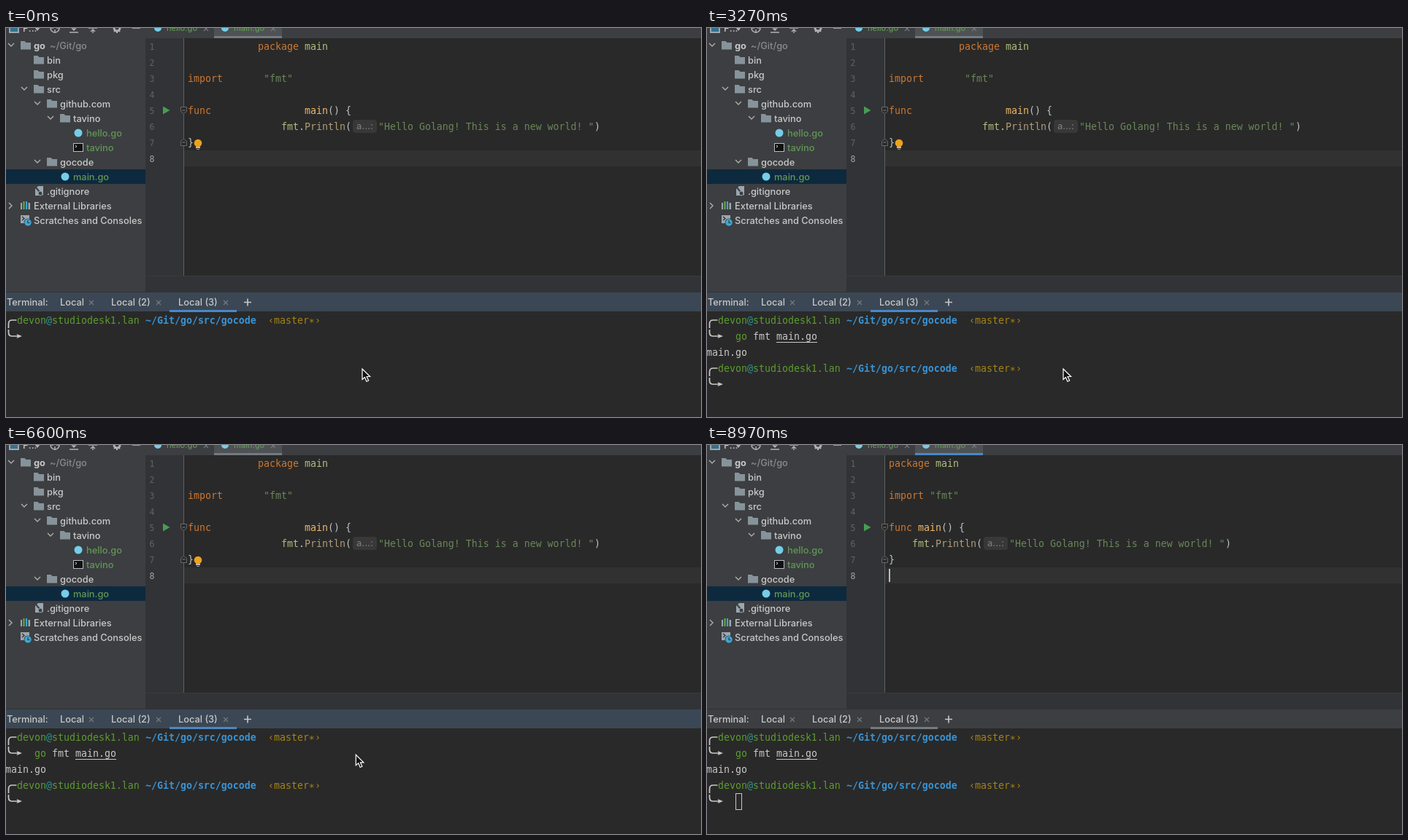
These frames come from a looping animation (952x534 px, 9010 ms). An HTML page:

```html
<!DOCTYPE html>
<html lang="en">
<head>
<meta charset="utf-8">
<title>go fmt</title>
<style>
html, body { margin: 0; width: 100%; height: 100%; overflow: hidden; background: #292929; }
svg { display: block; }
text { white-space: pre; }
.ui { font: 500 12.8px Inter, "Open Sans", sans-serif; }
.mono { font: 13.288px "DejaVu Sans Mono", "Liberation Mono", monospace; font-variant-ligatures: none; }
.small { font-size: 11px; }
.num { font-size: 11.5px; }
.bold { font-weight: 700; }
</style>
</head>
<body>
<svg id="stage" width="952" height="534" viewBox="0 0 952 534"></svg>
<script>
const LOOP = 9010, COL = 8, ROW = 22;
const PANEL = '#3c3e41', EDITOR = '#292929', BLUE = '#4a88c7', GREY = '#747a80';
const GREEN = '#629755', KEY = '#cc7832', STR = '#6a8759', PLAIN = '#bcc3c8', PKG = '#afbf7e',
  FUNC = '#f0b868', LIGHT = '#c8c8c8', SHELL = '#5c9c2f';
const stage = document.getElementById('stage');

// Drawing helpers
const rect = (x, y, w, h, fill, extra = '') =>
  `<rect x="${x}" y="${y}" width="${w}" height="${h}" fill="${fill}" ${extra}/>`;
const line = (d, color, width = 1, extra = '') =>
  `<path d="${d}" fill="none" stroke="${color}" stroke-width="${width}" ${extra}/>`;
const shape = (d, fill, extra = '') => `<path d="${d}" fill="${fill}" ${extra}/>`;
const dot = (x, y, r, fill) => `<circle cx="${x}" cy="${y}" r="${r}" fill="${fill}"/>`;
const text = (cls, x, y, s, fill, extra = '') =>
  `<text class="${cls}" x="${x}" y="${y}" fill="${fill}" ${extra}>${s}</text>`;
const ui = (...a) => text('ui', ...a);
const mono = (...a) => text('mono', ...a);
const group = (id, body) => `<g id="${id}">${body}</g>`;
const codeY = n => 8 + n * ROW;
const termY = n => 384 + n * ROW;

const folder = (x, y) =>
  shape(`M${x} ${y - 6}h5.5l2 2h6.5v9.5h-14z`, '#87939a');
const chevron = (x, y, right) =>
  line(right ? `M${x - 3} ${y - 4}l4 4l-4 4` : `M${x - 4} ${y - 2}l4 4l4-4`, '#adadad', 1.4);
const cross = (x, y) =>
  line(`M${x - 3} ${y - 3}l6 6m0-6l-6 6`, '#777b7e', 1.1);
const fold = (y, up) =>
  shape(up ? `M239.5 ${y + 4.5}v-6l4-3l4 3v6z` : `M239.5 ${y - 4.5}v6l4 3l4-3v-6z`,
    EDITOR, 'stroke="#686868"') + line(`M241.5 ${y}h4`, '#808080');

function toolbar() {
  const c = '#afb1b3';
  return rect(4, -5, 14, 12, '#9aa7b0') + rect(6, -2, 10, 7, '#34718f') +
    ui(23, 5, 'P...', LIGHT) + shape('M39 -1h8l-4 5z', c) +
    `<circle cx="67" cy="0" r="6" fill="none" stroke="${c}" stroke-width="1.5"/>` +
    line('M67 -6v4M67 2v5M61 0h4M69 0h4', c, 1.4) +
    line('M87 6h12M93 -4v6M90 0l3 3l3-3', c, 1.4) +
    line('M113 0h12M119 7v-5M116 5l3-3l3 3', c, 1.4) +
    `<circle cx="152" cy="0" r="4" fill="none" stroke="${c}" stroke-width="3"/>` +
    line('M148 5l2-2M156 5l-2-2M152 3v4', c, 2) + line('M173 0h11', c, 1.6);
}

function tree() {
  const label = (x, y, s, fill = LIGHT) => ui(x, y + 4.7, s, fill);
  const dirs = [[20, 24], [38, 44, 'bin'], [38, 64, 'pkg'], [38, 84, 'src'],
    [56, 104, 'github.com'], [74, 124, 'tavino'], [56, 184, 'gocode']];
  return rect(0, 0, 191, 363, PANEL) + rect(0, 194, 191, 20, '#0d293e') + toolbar() +
    dirs.map(([x, y, s]) => folder(x, y) + (s ? label(x + 18, y, s) : '')).join('') +
    text('ui bold', 38, 28.7, 'go', LIGHT) + label(60, 24, '~/Git/go', '#8c8c8c') +
    [[7, 23], [25, 83], [43, 103], [61, 123], [43, 183]].map(p => chevron(...p)).join('') +
    dot(99, 144, 5.5, '#75cde8') + label(110, 144, 'hello.go', GREEN) +
    rect(92.5, 158.5, 13, 11, '#111', 'stroke="#b4bcc0"') +
    line('M95 161l2 1.5l-2 1.5', '#ddd') + label(110, 164, 'tavino', GREEN) +
    dot(81, 204, 5.5, '#75cde8') + label(92, 204, 'main.go', GREEN) +
    shape('M44 217h7v13h-11v-9z', '#9aa7b0') + line('M41 219l9 11', PANEL, 2) +
    `<circle cx="47" cy="227" r="3" fill="${PANEL}" stroke="#9aa7b0"/>` +
    label(56, 224, '.gitignore') + chevron(7, 244, true) +
    rect(20, 240, 2, 9, '#9aa7b0') + rect(23.5, 238, 2, 11, '#62b543') +
    rect(27, 238, 2, 11, '#40a6d0') + rect(30.5, 240, 2.5, 9, '#9aa7b0') +
    label(38, 244, 'External Libraries') +
    rect(20, 257, 12, 11, '#9aa7b0') + line('M22 259l3 2.5l-3 2.5', '#333', 1.3) +
    dot(30, 267, 5.5, PANEL) + dot(30, 267, 4.7, '#40a6d0') +
    line('M30 264v3.5h2.5', '#24414f', 1.2) + label(38, 264, 'Scratches and Consoles');
}

function editor() {
  const tab = (x, s) => dot(x, 0, 5, '#75cde8') + text('ui small', x + 12, 4, s, GREEN);
  let out = rect(191, 0, 761, 14, PANEL) + rect(285, 0, 93, 11, '#4e5254') +
    tab(208, 'hello.go') + tab(300, 'main.go') + cross(274, 1) + cross(366, 1) +
    rect(285, 11, 93, 3, GREY, 'id="fileMark"') +
    rect(191, 14, 53, 326, '#313336') + rect(244, 168, 708, 22, '#313131') +
    rect(243, 14, 1, 326, '#606060') +
    rect(191, 340, 761, 22, '#313336') + rect(191, 340, 761, 1, '#393b3d');
  for (let n = 1; n <= 8; n++)
    out += text('mono num', 196.5, codeY(n) - 0.5, n, n == 8 ? '#a4a3a3' : '#606366');
  return out;
}

// Source listing; columns give the start of each moved token.
function code(pkg, fmt, main, call) {
  const put = (col, n, s, fill, cls = '') => text('mono ' + cls, 249 + col * COL, codeY(n), s, fill);
  const px = 249 + (call + 12) * COL;
  return put(pkg, 1, 'package', KEY) + put(pkg + 8, 1, 'main', PKG) +
    put(0, 3, 'import', KEY) + put(fmt, 3, '"fmt"', STR) +
    put(0, 5, 'func', KEY) + put(main, 5, 'main', FUNC, 'fn') +
    put(main + 4, 5, '() {', PLAIN) +
    put(call, 6, 'fmt', PKG) + put(call + 3, 6, '.', PLAIN) +
    put(call + 4, 6, 'Println', '#b09d79') + put(call + 11, 6, '(', PLAIN) +
    `<g class="hint">${rect(px + 2, 126, 33, 18, '#383838', 'rx="4"')}` +
    ui(px + 7, 139, 'a...:', '#787878') + '</g>' +
    mono(px + 37, codeY(6), '"Hello Golang! This is a new world! "', STR) +
    mono(px + 37 + 37 * COL, codeY(6), ')', PLAIN) + put(0, 7, '}', PLAIN);
}

function prompt(n) {
  const y = termY(n) + 17;
  const part = (x, s, fill, cls = '') => text('mono ' + cls, x, y + 5, s, fill);
  return line(`M3.5 ${y + 11}v-6q0-5 5-5h6M3.5 ${y + 13}v4q0 5 5 5h8`, LIGHT, 1.7) +
    shape(`M14.5 ${y + 19}l7.5 3l-7.5 3l1.5-3z`, LIGHT) +
    part(15, 'devon', SHELL) + part(55, '@', '#299999') + part(63, 'studiodesk1.lan', SHELL) +
    part(191, '~/Git/go/src/gocode', '#3993d4', 'bold') +
    part(359, '‹master∗›', '#a78415');
}

function terminal() {
  return rect(0, 362, 952, 1, '#323232') + rect(0, 363, 952, 26, '#3b4754', 'id="header"') +
    rect(0, 389, 952, 145, EDITOR) + rect(224, 387, 92, 3, BLUE, 'id="termMark"') +
    [[1, 'Terminal:'], [74, 'Local'], [144, 'Local (2)'], [236, 'Local (3)']]
      .map(([x, s]) => ui(x, 381, s, LIGHT)).join('') +
    [117, 209, 301].map(x => cross(x, 377)).join('') +
    line('M326 376.5h10M331 371.5v10', LIGHT, 1.6) + prompt(0) +
    mono(39, 428, '', SHELL, 'id="cmd"') + mono(63, 428, '', LIGHT, 'id="sub"') +
    mono(95, 428, '', LIGHT, 'id="arg"') + rect(95, 431, 0, 1, LIGHT, 'id="under"') +
    mono(-1, 450, 'main.go', LIGHT, 'id="output"') + group('prompt2', prompt(3)) +
    rect(39, 412, 8, 22, '#bbb', 'id="block"') +
    rect(39.5, 478.5, 8, 22, 'none', `id="hollow" stroke="${LIGHT}"`);
}

stage.innerHTML = tree() + editor() +
  group('before', code(12, 13, 20, 16) + dot(263, 158, 5.3, '#eda21d') +
    rect(260, 163, 6, 2, '#bbb') + rect(261, 166, 4, 1, '#999')) +
  group('after', code(0, 7, 5, 4)) +
  group('run', shape('M215 107.5l9.5 5.5l-9.5 5.5z', '#499c54') + fold(113)) +
  group('foldTemp', fold(135)) + fold(157, true) +
  rect(249, 170, 2, 18, '#bbb', 'id="caret"') + terminal() +
  group('arrow', shape('M0 0v14.5l3.4-3l2.5 5.7l2.7-1.2l-2.5-5.5h4.5z', '#111',
    'stroke="#fff" stroke-width="1.2"')) +
  group('beam', line('M-3 -7.5q3 0 3 2v12q0 2-3 2M3 -7.5q-3 0-3 2v12q0 2 3 2M-2 3.5h4',
    '#f0f0f0', 1.1));

const el = id => document.getElementById(id);
const show = (id, on) => el(id).setAttribute('visibility', on ? 'visible' : 'hidden');
const attr = (id, name, value) => el(id).setAttribute(name, value);
const attrAll = (query, name, value) =>
  stage.querySelectorAll(query).forEach(e => e.setAttribute(name, value));

// Event times in ms
const TYPE = 350, KEYSTROKE = 110, ENTER = 2400, PRINT = 2520, READY = 2600,
  FOCUS = 6850, PARSED = 7400;
const COMMAND = 'go fmt main.go';
const MOUSE = [[0, 488, 468], [4700, 488, 468], [4900, 488, 459], [6530, 488, 459],
  [6820, 430, 235], [6870, 430, 235], [7050, 407, 143], [7400, 407, 143],
  [7850, 320, 153], [8430, 320, 153], [8850, 640, -30], [LOOP, 640, -30]];

function mouseAt(t) {
  const i = MOUSE.findIndex(k => k[0] > t);
  const [t0, x0, y0] = MOUSE[i - 1], [t1, x1, y1] = MOUSE[i];
  const u = (t - t0) / (t1 - t0), e = u * u * (3 - 2 * u);
  return [x0 + (x1 - x0) * e, y0 + (y1 - y0) * e];
}

function draw(t) {
  const focus = t >= FOCUS, parsed = !focus || t >= PARSED;
  show('before', !focus);
  show('after', focus);
  show('run', parsed);
  show('foldTemp', !parsed);
  attrAll('.hint', 'opacity', parsed ? 1 : 0.55);
  attrAll('.fn', 'fill', parsed ? FUNC : PLAIN);
  attr('fileMark', 'fill', focus ? BLUE : GREY);
  attr('termMark', 'fill', focus ? GREY : BLUE);
  attr('header', 'fill', focus ? PANEL : '#3b4754');
  show('caret', focus && (t - FOCUS) % 1000 < 500);

  const n = Math.max(0, Math.min(COMMAND.length, Math.floor((t - TYPE) / KEYSTROKE) + 1));
  const typed = COMMAND.slice(0, n);
  el('cmd').textContent = typed.slice(0, 2);
  el('sub').textContent = typed.slice(3, 6);
  el('arg').textContent = typed.slice(7);
  attr('under', 'width', Math.max(0, n - 7) * COL);
  show('output', t >= PRINT);
  show('prompt2', t >= READY);

  const ready = t >= READY;
  attr('block', 'x', ready ? 39 : 39 + n * COL);
  attr('block', 'y', ready ? 478 : 412);
  show('block', !focus && (ready ? (t - READY) % 1010 < 505 : t >= 150 && t < ENTER));
  show('hollow', focus);

  const [x, y] = mouseAt(t), inCode = x > 191 && y > 14 && y < 340;
  for (const id of ['arrow', 'beam']) attr(id, 'transform', `translate(${x} ${y})`);
  show('arrow', !inCode);
  show('beam', inCode);
}

const start = performance.now();
function tick() {
  draw((performance.now() - start) % LOOP);
  requestAnimationFrame(tick);
}
draw(0);
requestAnimationFrame(tick);
</script>
</body>
</html>
```
